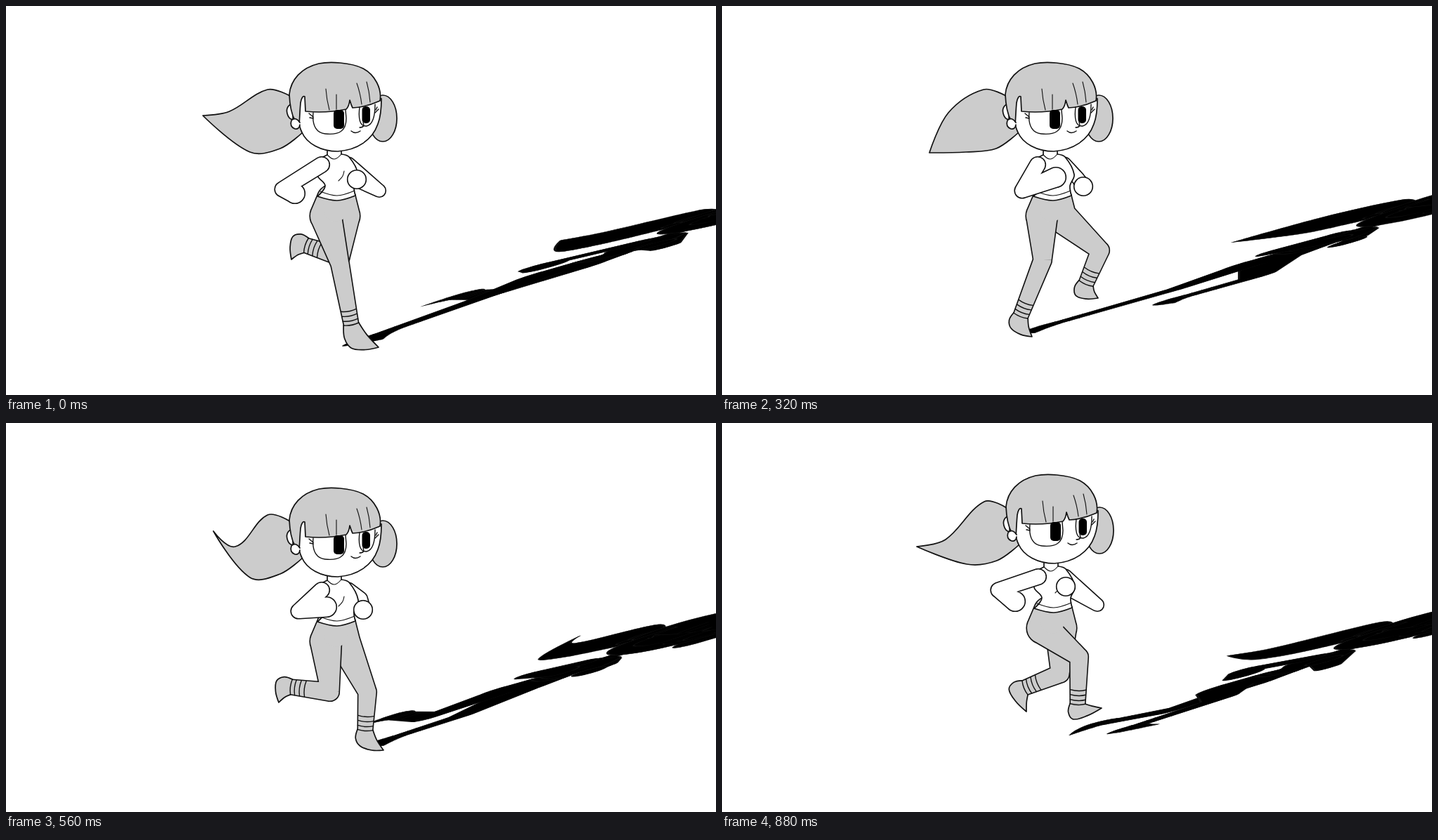
Recreate the animation shown at these times as an HTML page. Size 1010 by 554 pixels, loop 0.96 s.

```html
<!DOCTYPE html>
<html lang="en">
<head>
<meta charset="utf-8">
<title>Run cycle</title>
<style>
  html, body { margin: 0; width: 100%; height: 100%; overflow: hidden; background: #fff; }
  svg { display: block; width: 100%; height: 100%; --skin: #fff; --grey: #ccc; }
  #shadow { --skin: #000; --grey: #000; }
  path, ellipse { stroke: #111; stroke-width: 1.7; stroke-linecap: round; stroke-linejoin: round; }
  .skin { fill: var(--skin); }
  .grey { fill: var(--grey); }
  .limb { stroke-width: 3.2; paint-order: stroke; }
  .patch { stroke: none; }
  .line { fill: none; stroke-width: 1.4; }
  .thin { fill: none; stroke-width: 1.1; }
  .ink { fill: #000; }
</style>
</head>
<body>
<svg viewBox="0 0 1010 554">
  <use id="shadow" href="#figure"/>
  <g id="figure">
    <g id="body"></g>
    <g id="head">
      <ellipse class="grey" cx="536" cy="160" rx="20" ry="33"/>
      <path class="skin" d="M409 140C402 139 398 146 400 153Q402 161 408 162Z"/>
      <path class="skin" d="M415 130C414 150 416 170 421 180C428 196 448 207 472 207C500 205 521 191 529 168Q534 155 534 132L480 110Z"/>
      <path class="grey" d="M417 172Q418 150 419 138Q421 127 425 129L426 150Q455 153 484 147Q488 143 489 134Q491 141 493 145Q512 144 532 135C535 118 525 98 508 89C490 80 460 79 445 82C420 88 405 105 403 126Q404 150 411 163Z"/>
      <path class="skin" d="M418 166Q412 157 406 163Q403 172 411 175Q417 176 418 169"/>
      <path class="thin" d="M455 118Q456 133 460 148M470 126L470 147M499 110Q504 124 506 140M513 108Q517 122 518 137"/>
      <path class="line" d="M437 152C435 172 443 181 454 182C474 184 484 178 484 160L483 148M503 144C501 160 503 172 513 171C522 169 525 156 525 140"/>
      <rect class="ink" x="466" y="148" width="15" height="27" rx="5"/>
      <rect class="ink" x="506.500" y="143" width="11.500" height="24" rx="5"/>
      <path class="line" d="M431 153L437 158M432 159L437 160M525 152L530 147M526 148L528 144M508 166Q511 173 503 173M491 178Q497 183 504 178"/>
    </g>
  </g>
</svg>
<script>
const LOOP = 960;
const keyTimes = [0, 200, 320, 480, 560, 720, 880];
const count = keyTimes.length;
const timeAt = i => keyTimes[(i + count) % count] + LOOP * Math.floor(i / count);

// A track moves smoothly through one value per key time, around the loop.
function track(...keys) {
  const key = i => keys[(i + count) % count];
  return t => {
    const i = keyTimes.findLastIndex(k => k <= t);
    const [t0, t1, t2, t3] = [-1, 0, 1, 2].map(k => timeAt(i + k));
    const span = t2 - t1, u = (t - t1) / span, v = 1 - u;
    return key(i).map((b, n) => {
      const a = key(i - 1)[n], c = key(i + 1)[n], d = key(i + 2)[n];
      const m1 = (c - a) / (t2 - t0) * span, m2 = (d - b) / (t3 - t1) * span;
      return b * (1 + 2 * u) * v * v + m1 * u * v * v + c * u * u * (3 - 2 * u) - m2 * u * u * v;
    });
  };
}

// Joints that lead the motion; everything else hangs on them.
const headMove = track([0, 0], [1, 12], [0, 0], [1, 0], [0, 12], [1, -7], [1, -7]);
const tailTip = track([280, 156], [281, 183], [295, 209], [285, 164], [295, 154], [302, 239], [277, 176]);
const tailBend = track([318, 150], [330, 173], [322, 152], [325, 162], [326, 176], [318, 176], [318, 166]);
const nearArm = {
  elbow: track([393, 261], [411, 264], [427, 263], [422, 265], [416, 268], [406, 246], [393, 238]),
  fist: track([411, 267], [446, 266], [475, 244], [466, 243], [456, 262], [435, 254], [417, 254])
};
const farArm = {
  elbow: track([531, 263], [528, 259], [507, 246], [482, 240], [505, 250], [522, 245], [534, 259]),
  fist: track([499, 247], [526, 269], [514, 257], [468, 245], [508, 266], [520, 250], [489, 233])
};
const nearLeg = {
  knee: track([475, 367], [474, 386], [456, 362], [446, 370], [461, 383], [491, 362], [508, 333]),
  ankle: track([491, 453], [462, 446], [425, 441], [383, 354], [406, 376], [455, 387], [506, 400]),
  toe: track([530, 486], [477, 478], [441, 471], [362, 377], [388, 398], [459, 424], [540, 406])
};
const farLeg = {
  knee: track([476, 357], [506, 388], [538, 348], [509, 375], [514, 383], [482, 375], [481, 357]),
  ankle: track([427, 341], [464, 393], [518, 395], [528, 446], [511, 437], [466, 425], [431, 377]),
  toe: track([406, 361], [459, 420], [535, 416], [570, 447], [537, 466], [485, 447], [433, 411])
};
// Where the ground point (500, 460) casts to, and how wide the shadow spreads.
const light = track([541, 466, 1.36], [533, 461, 1.16], [530, 452, 1.12], [503, 465, 1],
  [513, 458, .9], [482, 458, 1.08], [486, 464, 1.1]);

const add = (a, b, k = 1) => [a[0] + b[0] * k, a[1] + b[1] * k];
const lerp = (a, b, k) => [a[0] + (b[0] - a[0]) * k, a[1] + (b[1] - a[1]) * k];
const unit = (a, b) => {
  const len = Math.hypot(b[0] - a[0], b[1] - a[1]) || 1;
  return [(b[0] - a[0]) / len, (b[1] - a[1]) / len];
};
const perp = u => [-u[1], u[0]];
const dot = (a, b) => a[0] * b[0] + a[1] * b[1];
const xy = p => p[0].toFixed(1) + ' ' + p[1].toFixed(1);

// Smooth path through points; listed indices stay sharp.
function curve(pts, sharp = [], closed = false) {
  const n = pts.length, at = i => pts[(i + n) % n];
  const dir = i => {
    i %= n;
    if (sharp.includes(i) || (!closed && (i === 0 || i === n - 1))) return [0, 0];
    return unit(at(i - 1), at(i + 1));
  };
  let d = 'M' + xy(pts[0]);
  for (let i = 0; i < n - (closed ? 0 : 1); i++) {
    const a = at(i), b = at(i + 1), k = Math.hypot(b[0] - a[0], b[1] - a[1]) / 3;
    d += 'C' + [add(a, dir(i), k), add(b, dir(i + 1), -k), b].map(xy).join(' ');
  }
  return d + (closed ? 'Z' : '');
}

// Union of discs joined by tapered bars.
function limb(...joints) {
  return joints.map(([p, r], i) => {
    let d = `M${xy([p[0] - r, p[1]])}a${r} ${r} 0 1 0 ${2 * r} 0a${r} ${r} 0 1 0 ${-2 * r} 0Z`;
    if (i) {
      const [q, s] = joints[i - 1], n = perp(unit(q, p));
      d += 'M' + [add(q, n, s), add(p, n, r), add(p, n, -r), add(q, n, -s)].map(xy).join('L') + 'Z';
    }
    return d;
  }).join('');
}

const ANKLE = 11;

function shoe(knee, ankle, toe) {
  const u = unit(knee, ankle), out = add(toe, ankle, -1);
  const n = dot(out, perp(u)) < 0 ? perp(u).map(x => -x) : perp(u);
  const drop = Math.max(22, dot(out, u) * .85);
  const spot = (down, side) => add(add(ankle, u, down), n, side);
  const front = spot(0, ANKLE), heel = spot(drop, 5 - ANKLE);
  const instep = add(lerp(front, toe, .5), n, -2);
  return curve([spot(0, -ANKLE), spot(drop * .55, -ANKLE - 2), heel,
    add(lerp(heel, toe, .5), u, 3), toe, instep, front], [4]);
}

function bands(knee, ankle) {
  const u = unit(ankle, knee), n = perp(u);
  return [0, 6, 13, 20].map(px => {
    const c = add(ankle, u, px);
    return `M${xy(add(c, n, ANKLE))}Q${xy(add(c, u, -3))} ${xy(add(c, n, -ANKLE))}`;
  }).join('');
}

// Drawing order, back to front.
const get = id => document.getElementById(id);
const el = {};
const layers = {
  tail: 'grey', farArm: 'skin limb', farLeg: 'grey limb', farShoe: 'grey', farBands: 'line',
  leg: 'grey limb', shoe: 'grey', bands: 'line', pelvis: 'grey patch',
  torso: 'skin', seams: 'thin', farFist: 'skin limb', arm: 'skin limb'
};
for (const id in layers) {
  el[id] = get('body').appendChild(document.createElementNS('http://www.w3.org/2000/svg', 'path'));
  el[id].setAttribute('class', layers[id]);
}
const put = (id, d) => el[id].setAttribute('d', d);

function drawLeg(leg, hips, side, t, ids) {
  const [knee, ankle, toe] = [leg.knee(t), leg.ankle(t), leg.toe(t)];
  put(ids[0], limb([add(hips, [side * 7 - 1, 3], 1), 20], [add(hips, [side * 13 - 3, 27]), 22],
    [knee, 12.5], [ankle, ANKLE - 1]));
  put(ids[1], shoe(knee, ankle, toe));
  put(ids[2], bands(knee, ankle));
}

function drawTorso(chest, hips) {
  const c = (x, y) => add(chest, [x, y]), h = (x, y) => add(hips, [x, y]);
  put('torso', curve([c(-10, -10), c(-10, 0), c(-18, 4), c(-24, 29), h(-17, -16), h(-28, -1), h(0, 5),
    h(26, -2), h(24, -16), c(34, 28), c(21, 3), c(10, -1), c(10, -10)], [0, 1, 2, 5, 7, 11, 12], true));
  put('seams', curve([h(-24, -8), h(0, -2), h(25, -9)]) + curve([c(-10, 0), c(0, 6), c(10, -1)]) +
    curve([c(14, 23), c(12, 30), c(6, 37)]));
}

function drawTail(move, t) {
  const at = (x, y) => add(move, [x, y]), tip = tailTip(t);
  const sag = Math.max(0, tip[1] - move[1] - 220) * .7;
  put('tail', curve([at(404, 128), at(372, 119), tailBend(t), tip,
    at(347, 208 + sag), at(390, 203 + sag / 2), at(422, 180)], [3]));
}

function castShadow(t) {
  const [x, y, a] = light(t);
  const b = .3 - .38 * a, c = -1.19 - .45 * a, d = .42 + .127 * a;
  get('shadow').setAttribute('transform',
    `matrix(${a} ${b} ${c} ${d} ${x - 500 * a - 460 * c} ${y - 500 * b - 460 * d})`);
}

function draw(t) {
  const move = headMove(t), chest = add(move, [467, 212]), hips = add(move, [471, 272]);
  get('head').setAttribute('transform', `translate(${move})`);
  drawTail(move, t);
  drawTorso(chest, hips);
  drawLeg(farLeg, hips, 1, t, ['farLeg', 'farShoe', 'farBands']);
  drawLeg(nearLeg, hips, -1, t, ['leg', 'shoe', 'bands']);
  put('pelvis', limb([add(hips, [-2, 4]), 18], [add(hips, [-2, 18]), 17]));
  put('farArm', limb([add(chest, [20, 13]), 9], [farArm.elbow(t), 8.5], [farArm.fist(t), 10]));
  put('farFist', limb([farArm.fist(t), 12.5]));
  put('arm', limb([add(chest, [-18, 14]), 10.5], [nearArm.elbow(t), 10], [nearArm.fist(t), 13.5]));
  castShadow(t);
}

// Held drawings: every 40 ms up to 560, then every 80 ms.
const hold = t => t < 560 ? Math.floor(t / 40) * 40 : Math.floor(t / 80) * 80;

const start = performance.now();
function tick() {
  draw(hold((performance.now() - start) % LOOP));
  requestAnimationFrame(tick);
}
tick();
</script>
</body>
</html>
```
